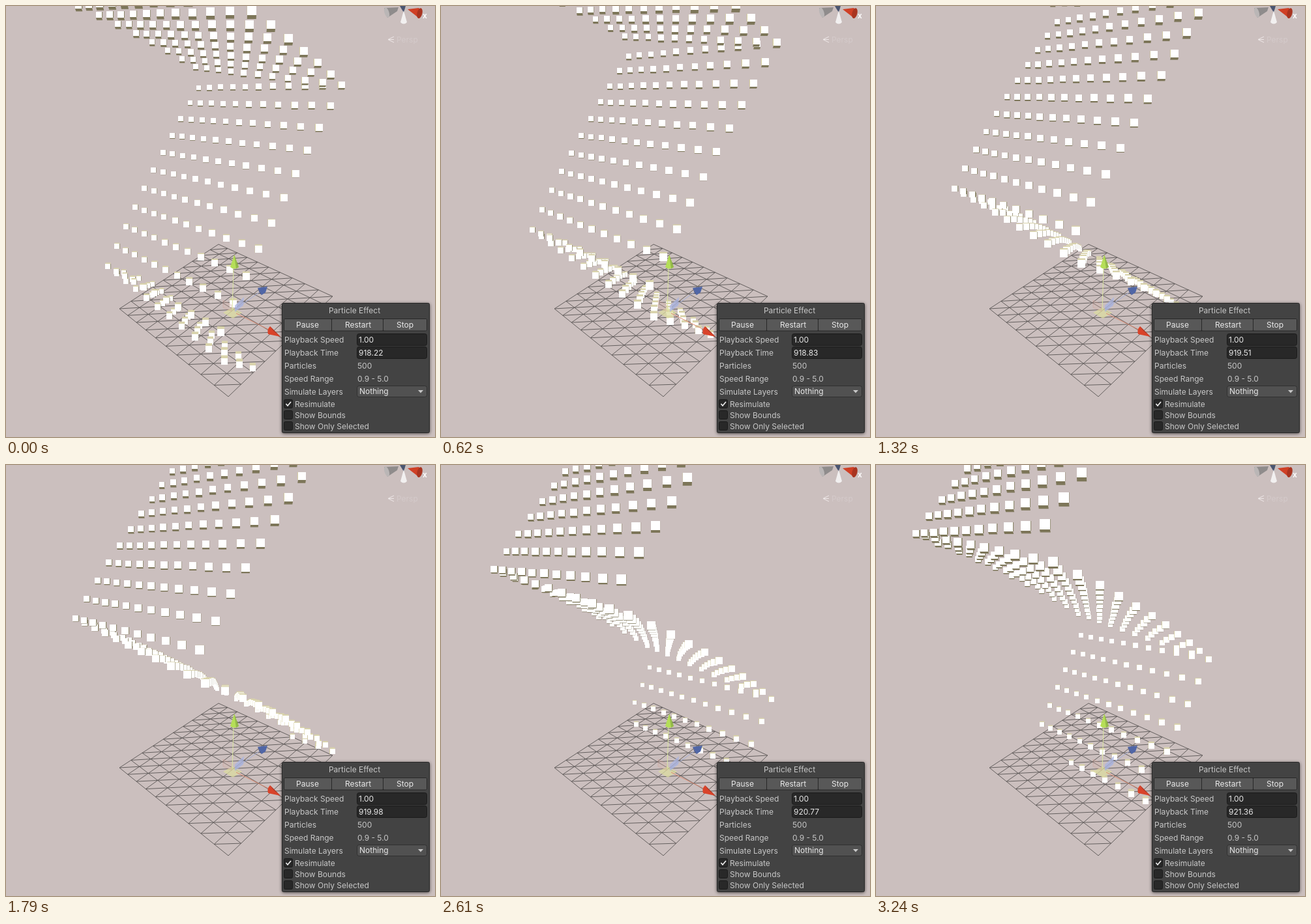
An HTML page with a canvas that plays this animation: 658x662 px, repeating every 3.3 s.

```html
<!DOCTYPE html>
<html>
<head>
<meta charset="utf-8">
<style>
html, body { margin: 0; width: 100%; height: 100%; overflow: hidden; background: #cbbfbe; }
canvas, svg { position: absolute; left: 0; top: 0; display: block; }
text { font-family: Inter, Roboto, sans-serif; font-size: 12px; fill: #c8c8c8; }
.bright { fill: #e8e8e8; }
.mid { text-anchor: middle; }
.field { fill: #282828; stroke: #1a1a1a; }
.button { fill: #585858; }
.frame { fill: #434343; stroke: #262626; filter: drop-shadow(0 1px 2.5px rgba(0, 0, 0, .6)); }
</style>
</head>
<body>
<canvas id="scene" width="658" height="662"></canvas>
<svg id="overlay" width="658" height="662" viewBox="0 0 658 662">
  <!-- transform handles -->
  <g>
    <path d="M333 471 347 463 362 471 348 480Z" fill="#dcdca0" opacity=".75"/>
    <path d="M351 460 365 447 364 460 351 470Z" fill="#a9b4e2" opacity=".75"/>
    <path d="M333 452 346 459 346 469 333 463Z" fill="#d8b3aa" opacity=".3" stroke="#d08a78"/>
    <path d="M347 467 349 403" stroke="#dbe6a0" fill="none"/>
    <path d="M353 465 388 440" stroke="#a3aed6" fill="none"/>
    <path d="M353 472 403 497" stroke="#dc8a70" fill="none"/>
    <path d="M350 382 344 401Q350 406 357 401Z" fill="#b5de58"/>
    <path d="M350 382 353 403.500 357 401Z" fill="#93b84a"/>
    <path d="M386 433 401 431 398 440 392 444Z" fill="#5066a6"/>
    <path d="M386 433 392 444 389 441Z" fill="#3c4d82"/>
    <path d="M405 492 421 508 402 504Q400 497 405 492Z" fill="#d9432a"/>
    <path d="M405 492 421 508 410 499Z" fill="#a83a28"/>
  </g>
  <!-- orientation gizmo -->
  <g>
    <path d="M580 3 602 2 600 8 585 18Z" fill="#8f8c8c"/>
    <ellipse cx="584" cy="10" rx="3.500" ry="8" transform="rotate(-18 584 10)" fill="#bab6b6"/>
    <path d="M604 0H613L610 10Z" fill="#4a5570"/>
    <path d="M605 25 610 7 615 25Q610 30 605 25Z" fill="#f2f0f0"/>
    <path d="M616 5 633 3 638 8 634 19Z" fill="#cf4026"/>
    <ellipse cx="634.500" cy="11" rx="4" ry="8" transform="rotate(14 634 11)" fill="#a83420"/>
    <text x="639" y="19" font-weight="600" style="fill:#fff">x</text>
    <path d="M595 47 586 51.500 595 56M587 51.500H595" fill="none" stroke="#efe9e9"/>
    <text x="599" y="56" style="fill:#d4caca">Persp</text>
  </g>
  <g id="panel">
    <rect class="frame" x="423.500" y="456.500" width="226" height="199" rx="2"/>
    <text class="mid" x="534.500" y="472">Particle Effect</text>
    <rect x="426" y="480" width="220" height="19.500" rx="3" fill="#282828"/>
  </g>
</svg>
<script>
const LOOP = 3300, STEPS = 48;
const panel = document.getElementById('panel');
const ctx = document.getElementById('scene').getContext('2d');

function add(tag, attrs, content) {
  const el = document.createElementNS('http://www.w3.org/2000/svg', tag);
  for (const key in attrs) el.setAttribute(key, attrs[key]);
  if (content) el.textContent = content;
  panel.appendChild(el);
  return el;
}
const box = (cls, x, y, width, height, rx = 2) => add('rect', { class: cls, x, y, width, height, rx });
const label = (str, x, y, cls = '') => add('text', { x, y, class: cls }, str);

function buildPanel() {
  [['Pause', 427, 72, 462.5], ['Restart', 500, 78, 540], ['Stop', 579, 66, 612]].forEach(([str, x, w, center]) => {
    box('button', x, 481, w, 17.5, 1);
    label(str, center, 494, 'mid bright');
  });
  ['Playback Speed', 'Playback Time', 'Particles', 'Speed Range', 'Simulate Layers']
    .forEach((str, i) => label(str, 427, 517 + i * 20));
  box('field', 538.5, 503.5, 107, 18, 3);
  box('field', 538.5, 523.5, 107, 18, 3);
  label('1.00', 541, 517, 'bright');
  label('500', 539, 557);
  label('0.9 - 5.0', 539, 577);
  add('rect', { x: 538.5, y: 583.5, width: 107, height: 17, rx: 3, fill: '#515151', stroke: '#303030' });
  label('Nothing', 542, 596, 'bright');
  add('path', { d: 'M632 590H640L636 594.500Z', fill: '#c8c8c8' });
  ['Resimulate', 'Show Bounds', 'Show Only Selected'].forEach((str, i) => {
    const y = 604.5 + i * 17;
    box('field', 426.5, y, 13, 13);
    label(str, 443, y + 11.5);
  });
  add('path', { d: 'M429.500 611 432 614 437 608', fill: 'none', stroke: '#eee', 'stroke-width': 1.7 });
  return label('', 541, 537, 'bright');
}
const clockText = buildPanel();

// Homogeneous screen-space basis: plane corner, its two sides, and one unit of height
const CORNER = [174, 465, 1], SIDE_X = [78.94, -19.94, -0.25823];
const SIDE_Z = [214.07, -29.31, 0.1904], UP = [-9.04, -25.26, -0.018];

function project(u, v, height = 0, drift = 0) {
  const [x, y, w] = CORNER.map((c, i) => c + u * SIDE_X[i] + v * SIDE_Z[i] + height * UP[i]);
  return { x: (x + drift) / w, y: y / w, w };
}

function drawPlane() {
  ctx.beginPath();
  const line = (u0, v0, u1, v1) => {
    const a = project(u0, v0), b = project(u1, v1);
    ctx.moveTo(a.x, a.y);
    ctx.lineTo(b.x, b.y);
  };
  for (let i = 0; i <= 10; i++) {
    const s = i / 10;
    line(s, 0, s, 1);
    line(0, s, 1, s);
    line(s, 0, 1, 1 - s);
    if (i) line(0, s, 1 - s, 1);
  }
  ctx.lineWidth = 1;
  ctx.strokeStyle = '#645f5e';
  ctx.stroke();
}

// Emission sweeps an 11 x 11 lattice back and forth, 50 particles a second
const RATE = 50, COUNT = 500, TURN_TIME = 919.915;
const SPEED = 5.365, DRAG = 0.16;

function particlesAt(time) {
  const newest = Math.floor((time - TURN_TIME) * RATE);
  const list = [];
  for (let k = 0; k < COUNT; k++) {
    const m = newest - k;
    const cell = Math.abs(120 - ((m % 240) + 240) % 240);
    const age = time - TURN_TIME - m / RATE;
    const height = SPEED / DRAG * (1 - Math.exp(-DRAG * age));
    const drift = 6.9 * age - 1.15 * age * age;
    const p = project(cell % 11 / 10, Math.floor(cell / 11) / 10, height, drift);
    if (p.y > -20) list.push(p);
  }
  return list.sort((a, b) => b.w - a.w);
}

function drawCube({ x, y, w }) {
  const size = Math.round(7.2 / w);
  const left = Math.round(x - size / 2), top = Math.round(y - size / 2);
  const dx = (340 - x) * 0.0006 * size;
  const dy = (270 - y) * 0.0016 * size;
  ctx.fillStyle = dx > 0 ? '#8a8468' : '#d6cf9c';
  ctx.fillRect(left + dx, top, size, size);
  ctx.fillStyle = dy > 0 ? '#7d7659' : '#d9d3ac';
  ctx.beginPath();
  const edge = dy > 0 ? top + size : top;
  ctx.moveTo(left, edge);
  ctx.lineTo(left + dx, edge + dy);
  ctx.lineTo(left + dx + size, edge + dy);
  ctx.lineTo(left + size, edge);
  ctx.fill();
  ctx.fillStyle = '#fff';
  ctx.fillRect(left, top, size, size);
}

const CLOCK = [[0, 918.22], [5, 918.55], [13, 919.10], [26, 919.98], [34, 920.49], [42, 921.05], [47, 921.36]];

function clockAt(step) {
  const i = Math.max(1, CLOCK.findIndex(([s]) => s >= step));
  const [s0, c0] = CLOCK[i - 1], [s1, c1] = CLOCK[i];
  return c0 + (c1 - c0) * (step - s0) / (s1 - s0);
}

function render(ms) {
  const step = Math.min(STEPS - 1, Math.floor((ms % LOOP + 5) / (LOOP / STEPS)));
  const time = clockAt(step);
  ctx.fillStyle = '#cbbfbe';
  ctx.fillRect(0, 0, 658, 662);
  drawPlane();
  particlesAt(time).forEach(drawCube);
  clockText.textContent = time.toFixed(2);
}

const start = performance.now();
function tick() {
  render(performance.now() - start);
  requestAnimationFrame(tick);
}
tick();
</script>
</body>
</html>
```
